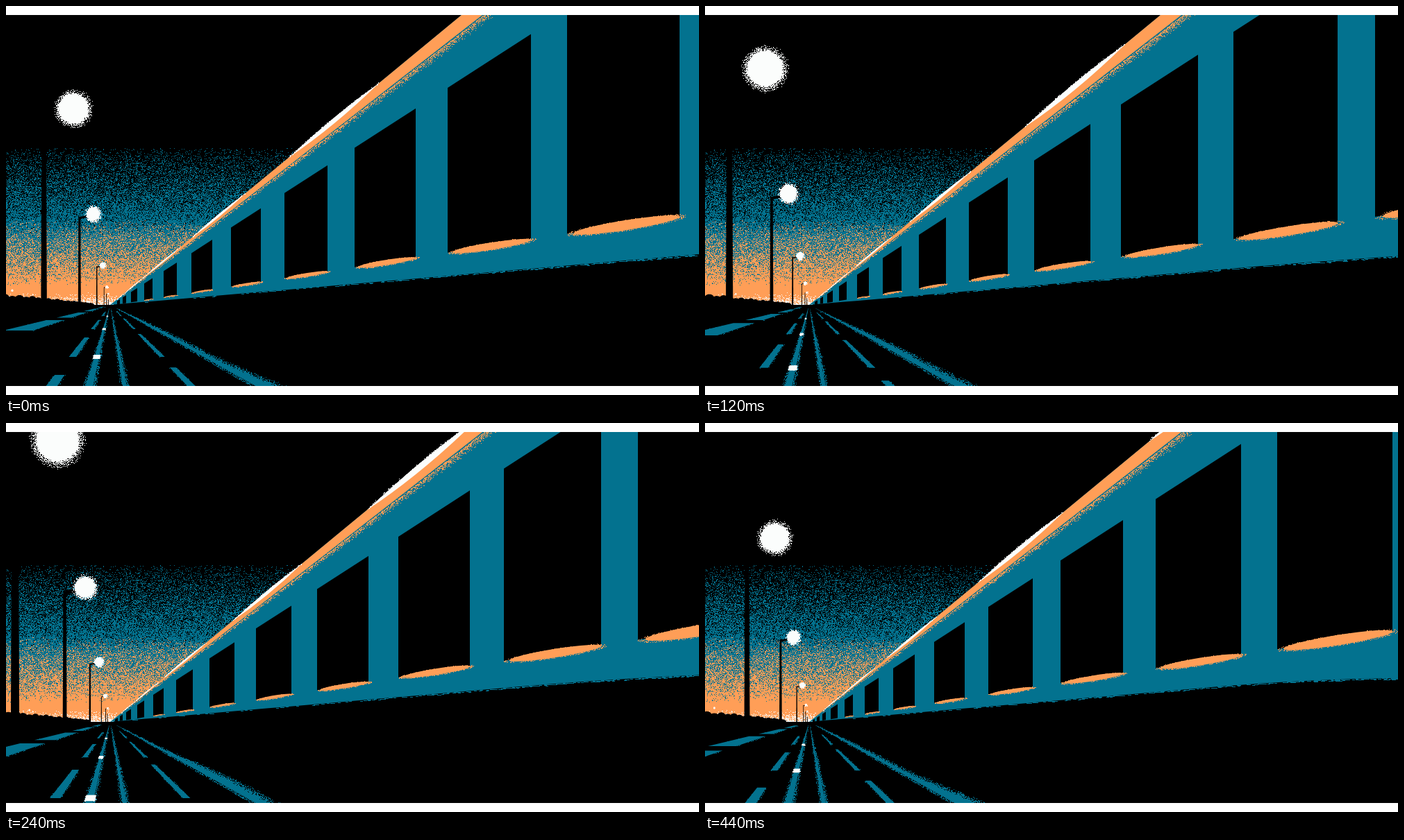
An HTML page with a canvas that plays this animation: 998x561 px, repeating every 480 ms.

```html
<!DOCTYPE html>
<html lang="en">
<head>
<meta charset="utf-8">
<title>Night train</title>
<style>
html, body { margin: 0; width: 100%; height: 100%; overflow: hidden; background: #fff; }
canvas { display: block; }
</style>
</head>
<body>
<canvas id="stage" width="998" height="561"></canvas>
<script>
const ctx = document.getElementById('stage').getContext('2d');
const TEAL = '#03728f', ORANGE = '#ff9e57', WHITE = '#fbfdfc', BLACK = '#000';
const W = 998, TOP = 13, BOTTOM = 548, VX = 150, VY = 431;
const LOOP = 480, STEP = 40;
const ROOF = 0.826, BAND = 0.777;

// Screen positions one loop apart; values between them are splined.
const winLeft = [1300, 1024, 808, 636, 502, 401, 324, 267, 227, 199, 180, 168, 160, 155, 152];
const winRight = [1570, 1240, 970, 756, 590, 463, 367, 297, 246, 211, 189, 173, 164, 158, 154];
const shineFrom = [155, 160, 172, 200, 268, 408, 668, 1100];
const shineTo = [160, 172, 200, 250, 345, 537, 880, 1500];
const lampRise = [4, 8, 16, 26, 57, 131, 283, 565, 1000];

function spline(tab, u) {
  const i = Math.floor(u), f = u - i;
  const at = n => tab[Math.max(0, Math.min(tab.length - 1, n))];
  const a = at(i - 1), b = at(i), c = at(i + 1), d = at(i + 2);
  return b + f / 2 * (c - a + f * (2 * a - 5 * b + 4 * c - d + f * (3 * (b - c) + d - a)));
}

let seed = 1;
function rnd() {
  seed = seed + 0x6D2B79F5 | 0;
  let n = Math.imul(seed ^ seed >>> 15, 1 | seed);
  n = n + Math.imul(n ^ n >>> 7, 61 | n) ^ n;
  return ((n ^ n >>> 14) >>> 0) / 4294967296;
}

function poly(color, ...pts) {
  ctx.fillStyle = color;
  ctx.beginPath();
  pts.forEach(([x, y]) => ctx.lineTo(x, y));
  ctx.fill();
}

function oval(color, x, y, rx, ry, turn = 0) {
  ctx.fillStyle = color;
  ctx.beginPath();
  ctx.ellipse(x, y, rx, ry, turn, 0, 7);
  ctx.fill();
}

// Scatter specks; place() returns [x, y].
function spray(color, count, place, w = 1) {
  ctx.fillStyle = color;
  for (let i = 0; i < count; i++) {
    const [x, y] = place();
    ctx.fillRect(Math.round(x), Math.round(y), w, 1);
  }
}

const clamp = v => Math.max(0, Math.min(1, v));

function makeSky() {
  const c = document.createElement('canvas');
  c.width = 440;
  c.height = VY;
  const g = c.getContext('2d');
  for (let y = 205; y < VY; y++) {
    const teal = clamp(0.06 + (y - 207) / 135);
    const warm = clamp((y - 308) / 95);
    const pale = clamp((y - 411) / 20);
    const end = Math.min(440, VX + (VY - y) / ROOF + 3);
    for (let x = 0; x < end; x++) {
      const color = rnd() < pale * pale ? WHITE
        : rnd() < warm ? ORANGE
        : rnd() < teal ? TEAL : null;
      if (color) {
        g.fillStyle = color;
        g.fillRect(x, y, 1, 1);
      }
    }
  }
  return c;
}
const sky = makeSky();

function drawTrees(p) {
  for (let k = -22; k < 5; k++) {
    const d = 141 * 1.47 ** (p + k / 5);
    const v = ((k % 5) + 5) % 5;
    const h = d * (0.092 + 0.011 * (v * 2 % 5) / 2);
    oval(BLACK, VX - d, VY - h * 0.6, d * 0.05, h * 0.4);
    ctx.fillRect(VX - d * 1.1, VY - h * 0.6, d * 0.2, h);
  }
  for (let k = -2; k < 2; k++) {
    const d = 141 * 1.47 ** (p + k);
    oval(WHITE, VX - d, VY - d * 0.147, d * 0.011, d * 0.013);
  }
}

function drawLamps(p) {
  for (let k = 0; k < 8; k++) {
    const h = spline(lampRise, k + p);
    if (h > 570 || h < 7) continue;
    const x = VX - 0.187 * h, y = VY - h, r = 0.088 * h;
    const px = VX - 0.337 * h, w = Math.max(1, 0.03 * h);
    poly(BLACK, [px - w * 0.38, y + 0.03 * h], [px + w * 0.38, y + 0.03 * h],
      [px + w / 2, VY], [px - w / 2, VY]);
    poly(BLACK, [px - w * 0.4, y + 0.03 * h], [x, y + 0.005 * h],
      [x, y + 0.025 * h], [px, y + 0.055 * h]);
    oval(WHITE, x, y, r * 0.84, r * 0.84);
    spray(WHITE, r * r * 1.7, () => {
      const a = rnd() * 6.2832, q = r * (0.8 + 0.38 * rnd() * rnd());
      return [x + q * Math.cos(a), y + q * Math.sin(a)];
    });
  }
}

function underEdge(x, p) {
  const far = clamp((x - 740) / 258);
  return VY - 0.0861 * (x - VX) + 11 * p * far * far;
}

function drawShine(p) {
  const rail = x => VY - ROOF * (x - VX);
  for (let k = 1; k < 7; k++) {
    const a = spline(shineFrom, k + p), b = spline(shineTo, k + p);
    const m = (a + b) / 2, d = m - VX;
    ctx.fillStyle = WHITE;
    ctx.beginPath();
    ctx.moveTo(a, rail(a));
    ctx.quadraticCurveTo(m, rail(m) - d * 0.02 - 0.8, b, rail(b));
    ctx.quadraticCurveTo(m, rail(m) + d * 0.028 + 0.8, a, rail(a));
    ctx.fill();
    spray(WHITE, (b - a) * 1.2, () => {
      const f = rnd(), x = a + (b - a) * f;
      return [x, rail(x) - d * 0.04 * f * (1 - f) - d * 0.008 * rnd() * rnd()];
    });
  }
}

function drawTrain(p) {
  const under = [];
  for (let x = W; x > VX; x -= 20) under.push([x, underEdge(x, p)]);
  poly(TEAL, [VX, VY], [656, TOP], [W, TOP], [W, underEdge(W, p)], ...under);
  spray(TEAL, 260, () => {
    const x = VX + (W - VX) * Math.sqrt(rnd());
    return [x, underEdge(x, p) + (x - VX) * 0.003 * rnd() * rnd()];
  }, 4);

  poly(ORANGE, [VX, VY], [656, TOP], [686, TOP]);
  spray(ORANGE, 2200, () => {
    const d = 560 * Math.sqrt(rnd());
    return [VX + d, VY - BAND * d + d * 0.026 * rnd() * rnd()];
  });
  drawShine(p);

  const head = x => VY + 1 - 0.646 * (x - VX);
  const sill = x => VY + 1 - 0.157 * (x - VX);
  for (let k = 12; k >= 0; k--) {
    const a = Math.round(spline(winLeft, k + p)), b = Math.round(spline(winRight, k + p));
    if (a > W) continue;
    poly(BLACK, [a, head(a)], [b, head(b)], [b, sill(b)], [a, sill(a)]);
    const w = b - a, cx = (a + b) / 2 + w * 0.03, cy = sill(cx) + w * 0.004;
    const rx = w * 0.48, ry = w * 0.044;
    if (w < 12) continue;
    oval(ORANGE, cx, cy, rx, ry, -0.157);
    spray(ORANGE, w * 1.6, () => {
      const t = rnd() * 6.2832, q = 0.95 + 0.16 * rnd();
      const ex = rx * q * Math.cos(t), ey = ry * q * Math.sin(t);
      return [cx + ex, cy + ey - ex * 0.157];
    });
  }
}

// Part of a road stripe between two rays, cut at two depths.
function stripe(color, a, b, near, far) {
  poly(color, [VX + a * far, VY + far], [VX + b * far, VY + far],
    [VX + b * near, VY + near], [VX + a * near, VY + near]);
}

function dashes(a, b, far, near, ratio, p) {
  for (let k = -2; k < 2; k++) {
    const s = ratio ** (p + k);
    stripe(TEAL, a, b, near * s, far * s);
    spray(TEAL, near * s * 0.6, () => {
      const h = s * (far + (near - far) * rnd());
      const ray = rnd() < 0.5 ? a : b;
      return [VX + h * (ray + (rnd() - 0.5) * 0.03), VY + h];
    });
  }
}

function solid(a, b, spread, count) {
  stripe(TEAL, a, b, 118, 5);
  spray(TEAL, count, () => {
    const h = 5 + 113 * Math.sqrt(rnd());
    const off = spread * rnd() * rnd();
    return [VX + h * (rnd() < 0.5 ? a - off : b + off), VY + h];
  });
}

function drawRoad(p) {
  dashes(-4.17, -3, 11, 18.5, 2, p);
  dashes(-0.79, -0.65, 47, 75, 2.15, p);
  dashes(0.95, 1.05, 42, 75, 2.15, p);
  solid(-0.3, -0.21, 0.05, 450);
  solid(0.155, 0.205, 0.05, 400);

  // The right kerb swells gently as it passes.
  const swell = h => 1.96 + 0.05 * Math.sin(h / 16 - p * 6.2832);
  const edge = [];
  for (let h = 5; h <= 120; h += 5) edge.push([VX + swell(h) * h, VY + h]);
  poly(TEAL, ...edge, [VX + 1.79 * 120, VY + 120], [VX + 1.79 * 5, VY + 5]);
  spray(TEAL, 1300, () => {
    const h = 5 + 113 * Math.sqrt(rnd());
    return [VX + h * (swell(h) + 0.2 * rnd() * rnd()), VY + h];
  });
  spray(TEAL, 300, () => {
    const h = 5 + 113 * Math.sqrt(rnd());
    return [VX + h * (1.79 - 0.06 * rnd()), VY + h];
  });

  for (let k = -2; k < 2; k++) {
    const h = 75 * 2.15 ** (p + k);
    stripe(WHITE, -0.325, -0.19, h * 1.04, h * 0.96);
    spray(WHITE, h * 0.25, () => [VX - h * (0.18 + 0.16 * rnd()), VY + h * (0.96 + 0.08 * rnd())]);
  }
}

function draw(t) {
  const p = t / LOOP;
  seed = 77;
  ctx.fillStyle = '#fff';
  ctx.fillRect(0, 0, W, 561);
  ctx.save();
  ctx.beginPath();
  ctx.rect(0, TOP, W, BOTTOM - TOP);
  ctx.clip();
  ctx.fillStyle = BLACK;
  ctx.fillRect(0, TOP, W, BOTTOM - TOP);
  ctx.drawImage(sky, 0, 0);
  drawTrees(p);
  drawLamps(p);
  drawTrain(p);
  drawRoad(p);
  ctx.restore();
}

let shown = -1;
function tick(now) {
  const t = Math.floor(now % LOOP / STEP) * STEP;
  if (t !== shown) draw(shown = t);
  requestAnimationFrame(tick);
}
draw(shown = 0);
requestAnimationFrame(tick);
</script>
</body>
</html>
```
